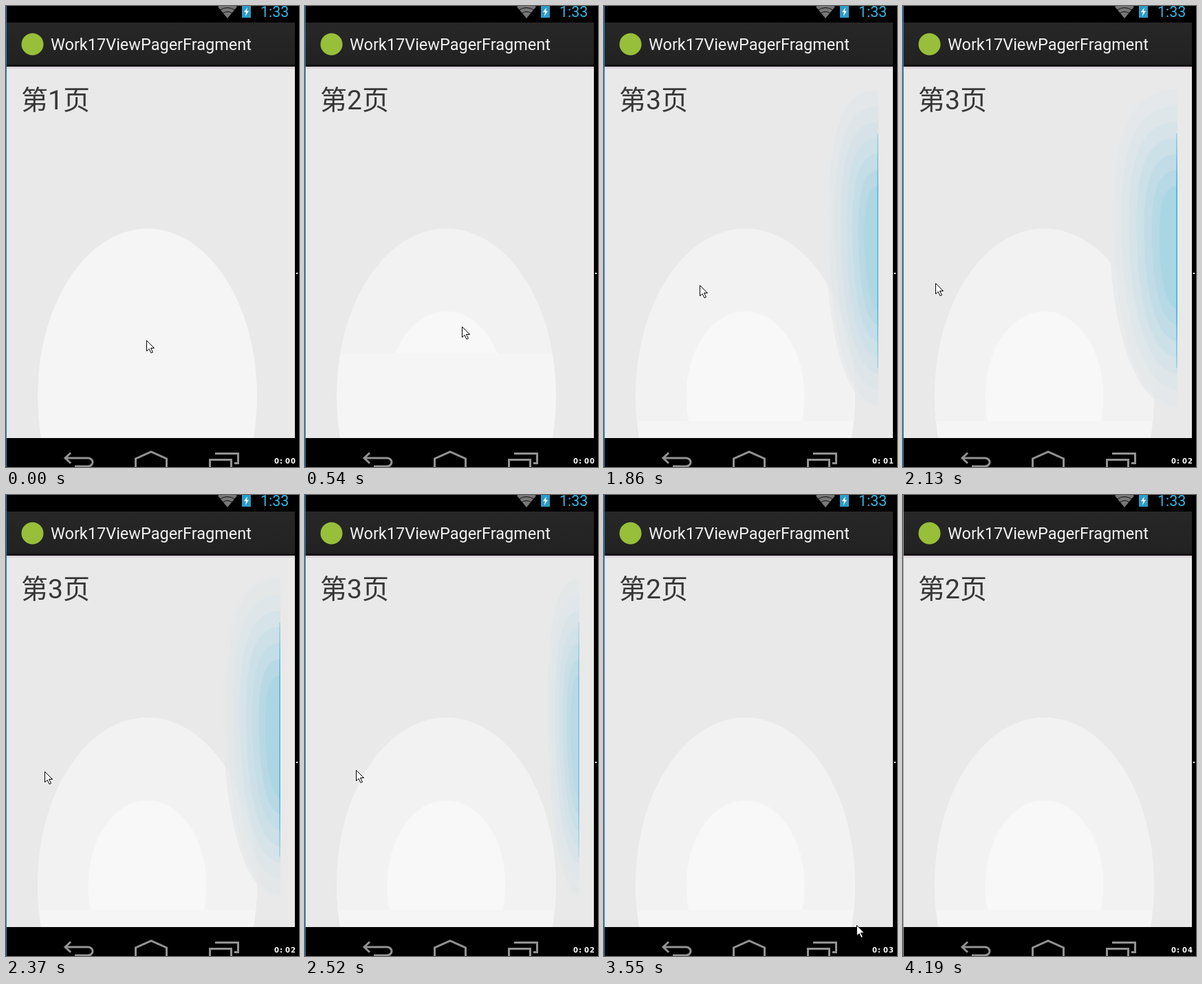
An HTML page that plays this animation: 426 by 669 pixels, repeating every 4290 ms.

```html
<!DOCTYPE html>
<html lang="zh-CN">
<head>
<meta charset="utf-8">
<title>ViewPager</title>
<style>
  html, body { margin: 0; width: 100%; height: 100%; overflow: hidden; background: #000; }
  svg { display: block; width: 426px; height: 669px; }
  text { font-family: Roboto, "Noto Sans CJK SC", "Noto Sans CJK", sans-serif; }
  .page { font-size: 39px; fill: #373737; }
  .clock { font: bold 10px "DejaVu Sans", sans-serif; fill: #fff; }
  .nav { fill: none; stroke: #929292; stroke-width: 3; }
</style>
</head>
<body>
<svg viewBox="0 0 426 669">
  <defs>
    <linearGradient id="bar" x2="0" y2="1">
      <stop stop-color="#272727"/>
      <stop offset=".93" stop-color="#222"/>
      <stop offset="1" stop-color="#0b0b0b"/>
    </linearGradient>
    <linearGradient id="edgeFade" x2="0" y2="1">
      <stop stop-color="#33b5e5" stop-opacity=".3"/>
      <stop offset=".25" stop-color="#33b5e5" stop-opacity=".8"/>
      <stop offset=".75" stop-color="#33b5e5" stop-opacity=".8"/>
      <stop offset="1" stop-color="#33b5e5" stop-opacity=".3"/>
    </linearGradient>
    <clipPath id="content"><rect y="91" width="420" height="536"/></clipPath>
    <clipPath id="pager"><rect x="22" y="113" width="377" height="491"/></clipPath>
    <clipPath id="repainted"><rect id="repaintedArea" width="420"/></clipPath>
  </defs>

  <rect width="426" height="669"/>
  <rect y="24" width="420" height="64" fill="url(#bar)"/>
  <rect y="88" width="420" height="539" fill="#e9e9e9"/>
  <rect y="88" width="420" height="3" fill="#dcd5da"/>

  <g clip-path="url(#content)">
    <ellipse cx="205.5" cy="566" rx="159.5" ry="243" fill="#f5f5f5"/>
    <g clip-path="url(#repainted)">
      <ellipse cx="205.5" cy="566" rx="159.5" ry="243" fill="#f2f2f2"/>
      <ellipse cx="205.5" cy="566" rx="86" ry="123" fill="#f8f8f8"/>
    </g>
  </g>

  <g clip-path="url(#pager)">
    <g id="pages">
      <text class="page" x="22" y="150">第1页</text>
      <text class="page" x="399" y="150">第2页</text>
      <text class="page" x="776" y="150">第3页</text>
    </g>
    <g id="glow"></g>
    <rect id="edge" x="397" y="185" width="2" height="340" fill="url(#edgeFade)"/>
  </g>

  <circle cx="38.5" cy="55.5" r="16" fill="#97bf3a"/>
  <text x="65" y="64" font-size="23.5" fill="#f3f3f3">Work17ViewPagerFragment</text>

  <path d="M308 1Q322-7 336 1L322 18z" fill="#777"/>
  <path d="M311 6Q322-1 333 6M315 10.500Q322 6 329 10.500" fill="none" stroke="#111"/>
  <rect x="343" width="13" height="17" fill="#2a9cc8"/>
  <path d="M351 2l-5 7h3l-1 6 5-8h-3z" fill="#fff"/>
  <text x="370" y="16" font-size="21.5" fill="#33b5e5">1:33</text>

  <g class="nav">
    <path d="M94 648.500L86 656l8 7.500M86 656h33a7 6 0 0 1 0 12h-19"/>
    <path d="M188.500 672v-15L211 647l22.500 10v15"/>
    <path d="M296.500 672v-13.500h31V672M304 649.500h33.500v14H332"/>
  </g>
  <rect x="422" y="387" width="2" height="2" fill="#fff"/>
  <rect id="border" width="1" height="669"/>
  <text id="clock" class="clock" x="390 398 406 414" y="664"></text>
  <path id="cursor" d="M.5.500v15.500l3.500-3.500 3 6 2.500-1-3-6h5z" fill="#fff" stroke="#000"/>
</svg>
<script>
const LOOP = 4290;
const TICK = 129.5; // the screen is grabbed at this interval, in ms
const PAGE = 377;
const $ = id => document.getElementById(id);
const set = (id, name, value) => $(id).setAttribute(name, value);

const linear = p => p;
const smooth = p => p * p * (3 - 2 * p);
const decelerate = p => 1 - (1 - p) ** 2.2;
const ramp = (tick, start, end, ease) =>
  ease(Math.min(1, Math.max(0, (tick - start) / (end - start))));

// Pointer strokes, in ticks; the pointer is hidden between them.
const strokes = [
  { start: 0, end: 1, from: [204, 485], to: [0, 470], ease: linear },
  { start: 4, end: 6, from: [228, 465], to: [295, 454], ease: linear },
  { start: 12, end: 17, from: [348, 410], to: [38, 402], ease: decelerate },
  { start: 17, end: 21, from: [38, 402], to: [110, 396], ease: linear },
  { start: 25, end: 28, from: [317, 436], to: [372, 642], ease: decelerate },
];

function addBand(scaleX, scaleY, fill, opacity) {
  const band = document.createElementNS("http://www.w3.org/2000/svg", "path");
  band.setAttribute("d", "M0-233C-60-233-96-190-96-50C-96 90-70 228 0 236z");
  band.setAttribute("transform", `scale(${scaleX} ${scaleY})`);
  band.setAttribute("fill", fill);
  band.setAttribute("opacity", opacity);
  $("glow").append(band);
}
addBand(1.04, 1, "#e8e9ea", .85);
for (let i = 1; i <= 7; i++) addBand(1.08 - i * .115, 1.08 - i * .1, "#3aafd0", .01 + i * .012);

function drawPointer(tick) {
  const stroke = strokes.find(s => tick >= s.start && tick <= s.end);
  set("cursor", "visibility", stroke ? "visible" : "hidden");
  if (!stroke) return;
  const { start, end, from, to, ease } = stroke;
  const p = ramp(tick, start, end, ease);
  const [x, y] = from.map((v, i) => Math.round(v + (to[i] - v) * p));
  set("cursor", "transform", `translate(${x} ${y})`);
}

function draw(now) {
  const t = now % LOOP;
  const tick = Math.floor(t / TICK);

  const page = ramp(tick, 0, 4, decelerate) + ramp(tick, 7, 10.2, smooth) - ramp(tick, 19, 25, decelerate);
  set("pages", "transform", `translate(${-page * PAGE})`);
  drawPointer(tick);

  const pull = ramp(tick, 12, 16, decelerate) - ramp(tick, 17, 21, smooth);
  set("glow", "transform", `translate(399 350) scale(${pull} 1)`);
  set("glow", "opacity", .45 + pull * .55);
  set("edge", "opacity", pull);

  set("repaintedArea", "height", tick < 1 ? 0 : tick < 14 ? 504 : 602);
  $("clock").textContent = `0:0${Math.floor((t + 60) / 1000)}`;
  set("border", "fill", t < 4190 ? "#0a84d8" : "#a0a0a0");
  requestAnimationFrame(draw);
}
draw(0);
</script>
</body>
</html>
```
